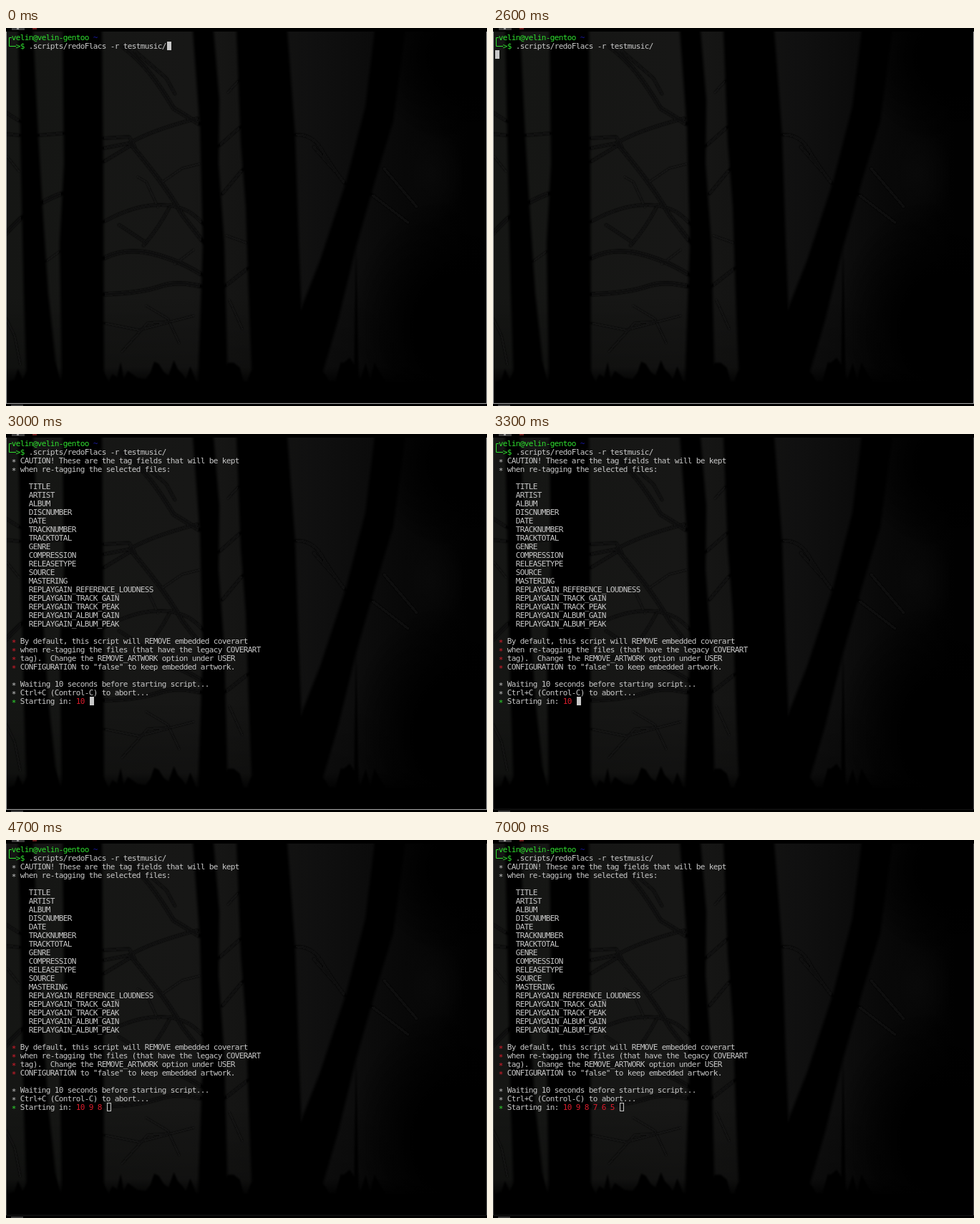
Write an HTML page that moves like this. It is 672 px wide and 528 px high and loops after 8 s.

```html
<!DOCTYPE html>
<html lang="en">
<head>
<meta charset="utf-8">
<title>Terminal</title>
<style>
  html, body { margin: 0; width: 100%; height: 100%; overflow: hidden; background: #000; }
  svg { display: block; width: 672px; height: 528px; }
  text { font: 11px "DejaVu Sans Mono", monospace; text-anchor: middle; white-space: pre; }
  .branches { fill: none; stroke: #090909; stroke-linecap: round; stroke-linejoin: round; }
  .trunks { stroke: #000; stroke-opacity: .45; stroke-width: 5; }
</style>
</head>
<body>
<svg viewBox="0 0 672 528">
  <defs>
    <linearGradient id="sky">
      <stop offset="0" stop-color="#151614"/>
      <stop offset=".38" stop-color="#171716"/>
      <stop offset=".5" stop-color="#141413"/>
      <stop offset=".64" stop-color="#101010"/>
      <stop offset=".74" stop-color="#0c0c0c"/>
      <stop offset=".86" stop-color="#060606"/>
      <stop offset=".96" stop-color="#010101"/>
    </linearGradient>
    <linearGradient id="dusk" x2="0" y2="1">
      <stop offset="0" stop-color="#000" stop-opacity="0"/>
      <stop offset=".8" stop-color="#000" stop-opacity=".25"/>
      <stop offset="1" stop-color="#000"/>
    </linearGradient>
    <radialGradient id="glow">
      <stop offset="0" stop-color="#090909"/>
      <stop offset="1" stop-color="#090909" stop-opacity="0"/>
    </radialGradient>
    <radialGradient id="shade">
      <stop offset=".4" stop-color="#000"/>
      <stop offset="1" stop-color="#000" stop-opacity="0"/>
    </radialGradient>
    <filter id="soft"><feGaussianBlur stdDeviation="1"/></filter>
  </defs>

  <rect width="672" height="528"/>
  <rect y="5" width="672" height="519" fill="url(#sky)"/>
  <ellipse cx="590" cy="205" rx="50" ry="70" fill="url(#glow)"/>
  <ellipse cx="650" cy="40" rx="140" ry="130" fill="url(#shade)"/>
  <ellipse cx="630" cy="420" rx="150" ry="190" fill="url(#shade)"/>
  <rect y="370" width="672" height="130" fill="url(#dusk)"/>

  <g filter="url(#soft)">
    <g class="branches">
      <g stroke-width="5">
        <path d="M163 26Q184 42 200 62T234 112L270 134"/>
        <path d="M174 162Q196 188 214 212T247 262L278 302"/>
        <path d="M136 322Q166 306 204 315T276 346"/>
        <path d="M136 372Q190 370 215 361T278 362"/>
        <path d="M0 287Q25 259 45 247T82 230"/>
      </g>
      <g stroke-width="3.500">
        <path d="M136 271Q180 246 218 247T276 275"/>
        <path d="M136 168L172 161Q205 142 268 126"/>
        <path d="M136 187L176 163M136 154L172 152L180 166"/>
        <path d="M192 304Q216 276 230 247M158 275L196 300"/>
        <path d="M180 32L224 70L236 92"/>
        <path d="M44 150L82 147M0 148L20 150M0 118L22 132"/>
        <path d="M296 166L330 136M304 362L340 334M302 232L332 196"/>
        <path d="M404 149Q428 148 441 170T474 218M430 166L460 200"/>
        <path d="M505 228L562 272M528 196L574 250"/>
      </g>
      <g stroke-width="2" stroke="#0e0e0e">
        <path d="M212 250L196 215L184 208M220 214L246 196L270 190"/>
        <path d="M196 388L226 406L242 440M136 412L186 422L262 402"/>
        <path d="M162 452L198 412L230 410M236 330L262 310"/>
        <path d="M0 405L12 430L20 470M2 180L18 200M50 330L78 310"/>
        <path d="M310 90L328 70M308 290L336 300M312 380L330 420"/>
      </g>
    </g>
    <g class="trunks">
      <path d="M18 4H37L44 150L50 250L58 370L72 500H30L26 380L22 200Z"/>
      <path d="M80 4H133L135 200L136 500H79L76 300L82 190Z"/>
      <path d="M262 4H289L297 100L296 190L304 300L309 500H269L276 300L272 140Z"/>
      <path d="M323 4H392L403 150L408 300L412 395L440 324L476 215L503 110L516 4H557L540 130L515 212L487 310L463 408L436 500H345L341 400L336 250L329 160Z"/>
    </g>
    <path d="M489 300L493 500H486Z" fill="#040404"/>
    <path d="M105.500 5V112" stroke="#0c0c0c" stroke-width="1.500"/>
    <path id="grass" fill="#010101"/>
  </g>

  <rect width="672" height="5"/>
  <rect y="525" width="672" height="3"/>
  <g fill="#3c3c3c">
    <rect x="8" width="18" height="3"/>
    <rect x="7" y="526" width="17" height="2"/>
  </g>
  <rect x="15" width="3" height="2" fill="#999"/>
  <rect x="37" width="6" height="2" fill="#6b1c1c"/>
  <path id="sides" d="M.5 5V524M671.500 5V524"/>
  <path id="base" d="M0 524.500H672"/>

  <path d="M8 13.500H4.500V25.500H14" fill="none" stroke="#2fe02f"/>
  <g id="prompt" xml:space="preserve"></g>
  <g id="output" xml:space="preserve"></g>
  <rect id="cursor"/>
</svg>

<script>
const $ = id => document.getElementById(id);
const GREY = '#c8c8c8', GREEN = '#2fe02f', RED = '#dc1c2c', BLUE = '#1818a0';
const LOOP = 8000, CELL_W = 6, CELL_H = 12, LEFT = 2, TOP = 7;
const COUNT = '10 9 8 7 6 5 ', COUNT_COL = 16;

// One glyph per terminal cell.
function print(parent, col, row, str, color = GREY, dy = 0) {
  const el = document.createElementNS('http://www.w3.org/2000/svg', 'text');
  el.setAttribute('x', [...str].map((_, i) => LEFT + (col + i + .5) * CELL_W).join(' '));
  el.setAttribute('y', TOP + row * CELL_H + 10 + dy);
  el.setAttribute('fill', color);
  el.textContent = str;
  parent.append(el);
  return el;
}

function notes(row, color, lines) {
  lines.forEach((line, i) => {
    print($('output'), 1, row + i, '*', color, 2);
    print($('output'), 3, row + i, line);
  });
}

print($('prompt'), 1, 0, 'velin@velin-gentoo', GREEN);
print($('prompt'), 20, 0, '~', BLUE);
print($('prompt'), 2, 1, '>$', GREEN);
print($('prompt'), 5, 1, '.scripts/redoFlacs -r testmusic/');

notes(2, GREY, [
  'CAUTION! These are the tag fields that will be kept',
  'when re-tagging the selected files:'
]);
['TITLE', 'ARTIST', 'ALBUM', 'DISCNUMBER', 'DATE', 'TRACKNUMBER', 'TRACKTOTAL',
  'GENRE', 'COMPRESSION', 'RELEASETYPE', 'SOURCE', 'MASTERING',
  ...['REFERENCE_LOUDNESS', 'TRACK_GAIN', 'TRACK_PEAK', 'ALBUM_GAIN', 'ALBUM_PEAK']
    .map(tag => 'REPLAYGAIN_' + tag)
].forEach((tag, i) => print($('output'), 5, 5 + i, tag));
notes(23, RED, [
  'By default, this script will REMOVE embedded coverart',
  'when re-tagging the files (that have the legacy COVERART',
  'tag).  Change the REMOVE_ARTWORK option under USER',
  'CONFIGURATION to "false" to keep embedded artwork.'
]);
notes(28, GREY, [
  'Waiting 10 seconds before starting script...',
  'Ctrl+C (Control-C) to abort...'
]);
notes(30, GREEN, ['Starting in:']);
const count = print($('output'), COUNT_COL, 30, COUNT, RED);

// Ragged undergrowth
let seed = 7;
const rand = () => (seed = seed * 16807 % 2147483647) / 2147483647;
let grass = 'M0 524V488';
for (let x = 3; x < 520; x += 4 + rand() * 5) {
  grass += `L${x.toFixed(1)} ${(494 - 34 * rand() ** 2).toFixed(1)}`;
}
$('grass').setAttribute('d', grass + 'L530 494H672V524Z');

// time, cursor column, cursor row, window focused, cursor filled
const STEPS = [
  [0, 37, 1, true, true],
  [2600, 0, 2, true, true],
  [3000, 19, 30, true, true],
  [3300, 19, 30, false, true],
  [3400, 19, 30, false, false],
  [3700, 21, 30, false, false],
  [4700, 23, 30, false, false],
  [5900, 25, 30, false, false],
  [6900, 27, 30, false, false],
  [7000, 29, 30, false, false]
];

function setAll(el, attrs) {
  for (const key in attrs) el.setAttribute(key, attrs[key]);
}

function show([, col, row, focused, filled]) {
  const inset = filled ? 0 : .5;
  setAll($('cursor'), {
    x: LEFT + col * CELL_W + 1 + inset,
    y: TOP + row * CELL_H + inset,
    width: CELL_W - 2 * inset,
    height: CELL_H - 2 * inset,
    fill: filled ? GREY : 'none',
    stroke: filled ? 'none' : GREY
  });
  $('sides').setAttribute('stroke', focused ? '#a8a8a8' : '#484848');
  $('base').setAttribute('stroke', focused ? '#a8a8a8' : '#141414');
  $('output').setAttribute('visibility', row === 30 ? 'visible' : 'hidden');
  count.textContent = COUNT.slice(0, Math.max(0, col - COUNT_COL));
}

let current;
function tick(now) {
  const t = now % LOOP;
  const step = STEPS.findLast(s => s[0] <= t) || STEPS[0];
  if (step !== current) show(current = step);
  requestAnimationFrame(tick);
}
tick(performance.now());
</script>
</body>
</html>
```
